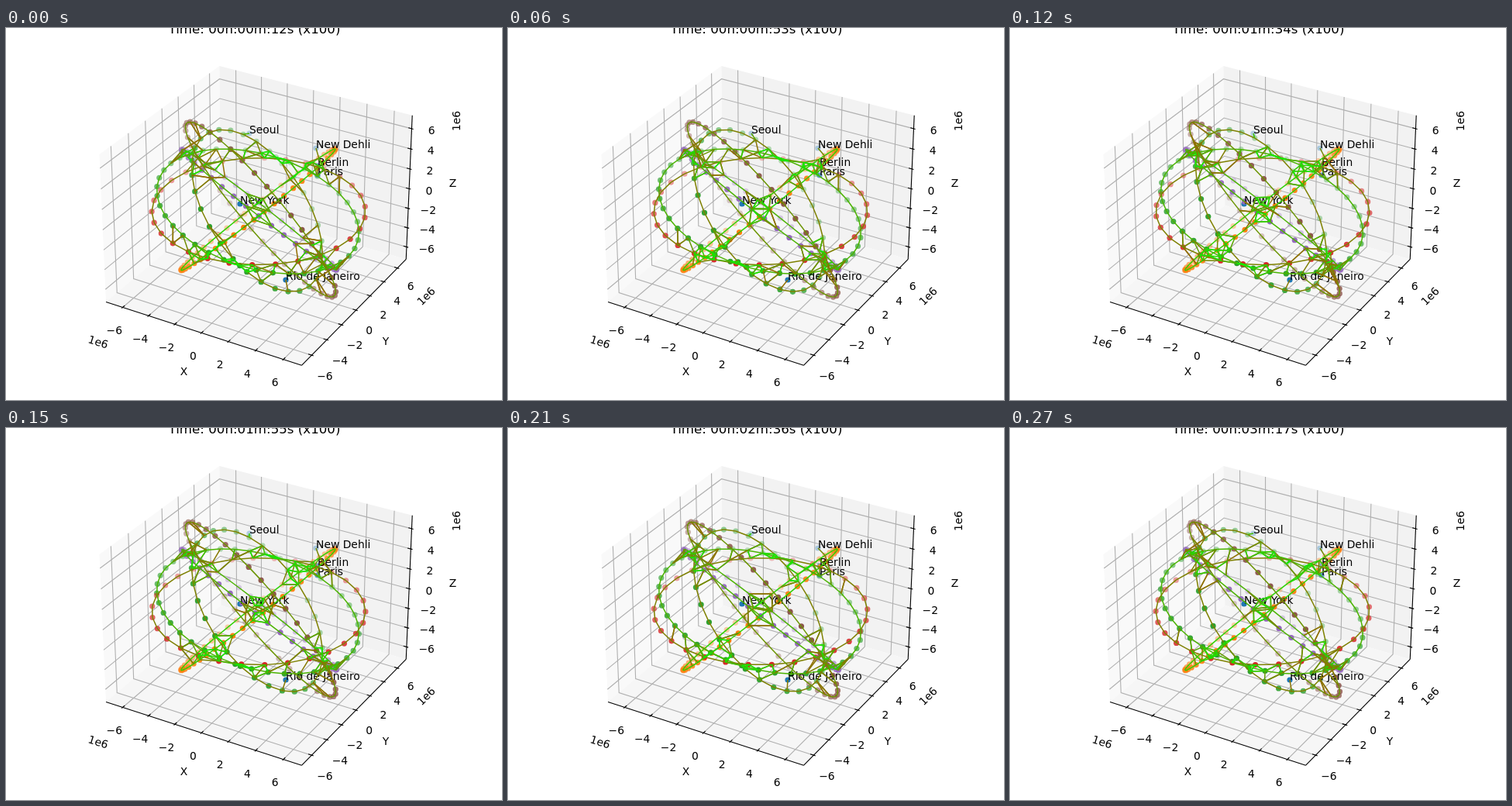
Recreate the animation shown at these times as an HTML page with a canvas. Size 640 px wide and 480 px high, loop 0.3 s.

```html
<!DOCTYPE html>
<html lang="en">
<head>
<meta charset="utf-8">
<title>Satellite links</title>
<style>
  html, body { margin: 0; width: 100%; height: 100%; overflow: hidden; background: #fff; }
  canvas { display: block; width: 640px; height: 480px; }
</style>
</head>
<body>
<canvas id="stage" width="640" height="480"></canvas>
<script>
const ctx = document.getElementById('stage').getContext('2d');
const RAD = Math.PI / 180;
const STEP_MS = 30, STEPS = 10;
const CX = 326, CY = 233.5, ZOOM = 2594.6;
const HALF = 0.5575, HALF_Z = 0.418, LIMIT = 7.3;
const ORBIT = 0.531;
const TICKS = [-6, -4, -2, 0, 2, 4, 6];

// size, tilt on screen, flatness, near side, satellites, phase and turn per step in degrees
const orbits = [
  { color: '#ff7f0e', r: 1, tilt: 43.8, flat: 0.055, near: -1, count: 50, phase: 4.4, turn: 1.285 },
  { color: '#2ca02c', r: 1, tilt: 155.2, flat: 0.635, near: 1, count: 40, phase: 6.1, turn: 1.285 },
  { color: '#2ca02c', r: 1, tilt: 115.7, flat: 0.48, near: 1, count: 30, phase: 5, turn: 1.285 },
  { color: '#d62728', r: 1, tilt: 0, flat: 0.61, near: -1, count: 30, phase: 2.7, turn: 1.285 },
  { color: '#9467bd', r: 1, tilt: 136.5, flat: 0.055, near: 1, count: 40, phase: 3, turn: 1.285 },
  { color: '#8c564b', r: 1.205, tilt: 124.6, flat: 0.165, near: -1, count: 40, phase: 7.5, turn: -0.965 }
];

const cities = [
  { name: 'Seoul', x: 314, y: 136, alpha: 0.3, orbit: 2 },
  { name: 'New Dehli', x: 400, y: 155, alpha: 0.35, orbit: 0 },
  { name: 'Berlin', x: 402, y: 178, alpha: 0.55, orbit: 1 },
  { name: 'Paris', x: 402, y: 190, alpha: 0.7, orbit: 1 },
  { name: 'New York', x: 302, y: 227, alpha: 1, orbit: -1 },
  { name: 'Rio de Janeiro', x: 361, y: 325, alpha: 1, orbit: 2 }
];

// box coordinates from -1 to 1 on each axis
function project(x, y, z) {
  x *= HALF; y *= HALF; z *= HALF_Z;
  const k = ZOOM / (10 - (0.433 * x - 0.75 * y + 0.5 * z));
  return [CX + k * (0.866 * x + 0.5 * y), CY - k * (-0.25 * x + 0.433 * y + 0.866 * z)];
}

function path(points, stroke, width) {
  ctx.beginPath();
  for (const [x, y] of points) ctx.lineTo(x, y);
  ctx.strokeStyle = stroke;
  ctx.lineWidth = width;
  ctx.stroke();
}

function pane(points, fill) {
  ctx.beginPath();
  for (const p of points) ctx.lineTo(...project(...p));
  ctx.closePath();
  ctx.fillStyle = fill;
  ctx.fill();
}

function label(text, x, y, { size = 13.89, align = 'center', turn = 0 } = {}) {
  ctx.save();
  ctx.translate(x, y);
  ctx.rotate(turn * RAD);
  ctx.font = `${size}px "DejaVu Sans", sans-serif`;
  ctx.textAlign = align;
  ctx.fillStyle = '#000';
  ctx.fillText(text, 0, turn ? 5 : 0);
  ctx.restore();
}

function dot(x, y, color, alpha) {
  ctx.globalAlpha = alpha;
  ctx.fillStyle = color;
  ctx.beginPath();
  ctx.arc(x, y, 3.6, 0, 2 * Math.PI);
  ctx.fill();
  ctx.globalAlpha = 1;
}

function drawAxes() {
  pane([[-1, -1, -1], [-1, 1, -1], [-1, 1, 1], [-1, -1, 1]], '#f9f9f9');
  pane([[-1, 1, -1], [1, 1, -1], [1, 1, 1], [-1, 1, 1]], '#f2f2f2');
  pane([[-1, -1, -1], [1, -1, -1], [1, 1, -1], [-1, 1, -1]], '#f6f6f6');

  const line = (points, color) => path(points.map(p => project(...p)), color, 1.11);
  for (const n of TICKS) {
    const t = n / LIMIT;
    line([[t, -1, -1], [t, 1, -1], [t, 1, 1]], '#b0b0b0');
    line([[1, t, -1], [-1, t, -1], [-1, t, 1]], '#b0b0b0');
    line([[-1, -1, t], [-1, 1, t], [1, 1, t]], '#b0b0b0');
  }
  line([[-1, -1, -1], [1, -1, -1]], '#000');
  line([[1, -1, -1], [1, 1, -1]], '#000');
  line([[1, 1, -1], [1, 1, 1]], '#000');

  for (const n of TICKS) {
    const t = n / LIMIT, text = String(n).replace('-', '\u2212');
    line([[t, -1.017, -1], [t, -0.967, -1]], '#000');
    line([[1.017, t, -1], [0.967, t, -1]], '#000');
    line([[1.017, 1, t], [0.967, 1, t]], '#000');
    const [ax, ay] = project(t, -1, -1);
    const [bx, by] = project(1, t, -1);
    const [zx, zy] = project(1, 1, t);
    label(text, ax - 10.8, ay + 34.5);
    label(text, bx + 17, by + 30.5 - n * 0.3);
    label(text, zx + 25.7, zy + 7.3);
  }
  label('X', 229.5, 447.5);
  label('Y', 490, 408.5);
  label('Z', 576.5, 204.5);
  label('1e6', 119, 405, { turn: 18 });
  label('1e6', 542, 346, { turn: -45 });
  label('1e6', 581, 120, { turn: -90 });
}

function satellites(orbit, index, step) {
  const c = Math.cos(orbit.tilt * RAD), s = Math.sin(orbit.tilt * RAD);
  const lift = orbit.near * Math.sqrt(1 - orbit.flat ** 2);
  return Array.from({ length: orbit.count }, (_, i) => {
    const a = (orbit.phase + orbit.turn * step + i * 360 / orbit.count) * RAD;
    const p = orbit.r * Math.cos(a), q = orbit.r * Math.sin(a);
    const u = p * c - q * orbit.flat * s;
    const v = p * s + q * orbit.flat * c;
    const w = q * lift;
    const depth = ORBIT * (0.915 * w - 0.231 * v);
    const k = ZOOM * ORBIT / (10 - depth);
    return { u, v, w, depth, index, x: CX + k * u, y: CY - k * 0.82 * v };
  });
}

const gap = (a, b) => Math.hypot(a.u - b.u, a.v - b.v, a.w - b.w);
const load = d => 3.8 * d - 0.3;

// green for short links, turning red with length
function link(a, b, amount) {
  const t = Math.min(1, Math.max(0.1, amount));
  path([[a.x, a.y], [b.x, b.y]], `rgb(${255 * t | 0},${255 * (1 - t) | 0},0)`, 1.5);
}

function drawLinks(rings) {
  const all = rings.flat();
  for (const ring of rings) {
    ring.forEach((sat, i) => {
      const next = ring[(i + 1) % ring.length];
      link(sat, next, load(gap(sat, next)));
    });
  }
  for (const sat of all) {
    all.filter(o => o.index !== sat.index)
      .map(o => ({ o, d: gap(sat, o) }))
      .filter(e => e.d < 0.23)
      .sort((a, b) => b.d - a.d)
      .slice(-3)
      .forEach(e => link(sat, e.o, load(e.d)));
  }
  for (const city of cities) {
    if (city.orbit < 0) continue;
    const far = s => Math.hypot(s.x - city.x, s.y - city.y);
    const best = rings[city.orbit].reduce((a, b) => far(a) < far(b) ? a : b);
    link(city, best, far(best) / 28);
  }
}

function drawRing(ring) {
  const depths = ring.map(s => s.depth);
  const min = Math.min(...depths), max = Math.max(...depths);
  for (const s of [...ring].sort((a, b) => a.depth - b.depth)) {
    dot(s.x, s.y, orbits[s.index].color, 0.3 + 0.7 * (s.depth - min) / (max - min));
  }
}

function draw(step) {
  ctx.fillStyle = '#fff';
  ctx.fillRect(0, 0, 640, 480);
  drawAxes();

  const rings = orbits.map((o, i) => satellites(o, i, step));
  for (const c of cities) dot(c.x, c.y, '#1f77b4', c.alpha);
  rings.forEach(drawRing);
  for (const c of cities) label(c.name, c.x, c.y, { align: 'left' });
  drawLinks(rings);

  const sec = Math.floor(12.5 + 20.5 * step);
  const pad = n => String(n).padStart(2, '0');
  label(`Time: 00h:${pad(Math.floor(sec / 60))}m:${pad(sec % 60)}s (x100)`, 320.5, 7, { size: 16.67 });
}

let shown = -1;
const start = performance.now();
function tick() {
  const step = Math.floor((performance.now() - start) / STEP_MS) % STEPS;
  if (step !== shown) draw(shown = step);
  requestAnimationFrame(tick);
}
tick();
</script>
</body>
</html>
```
